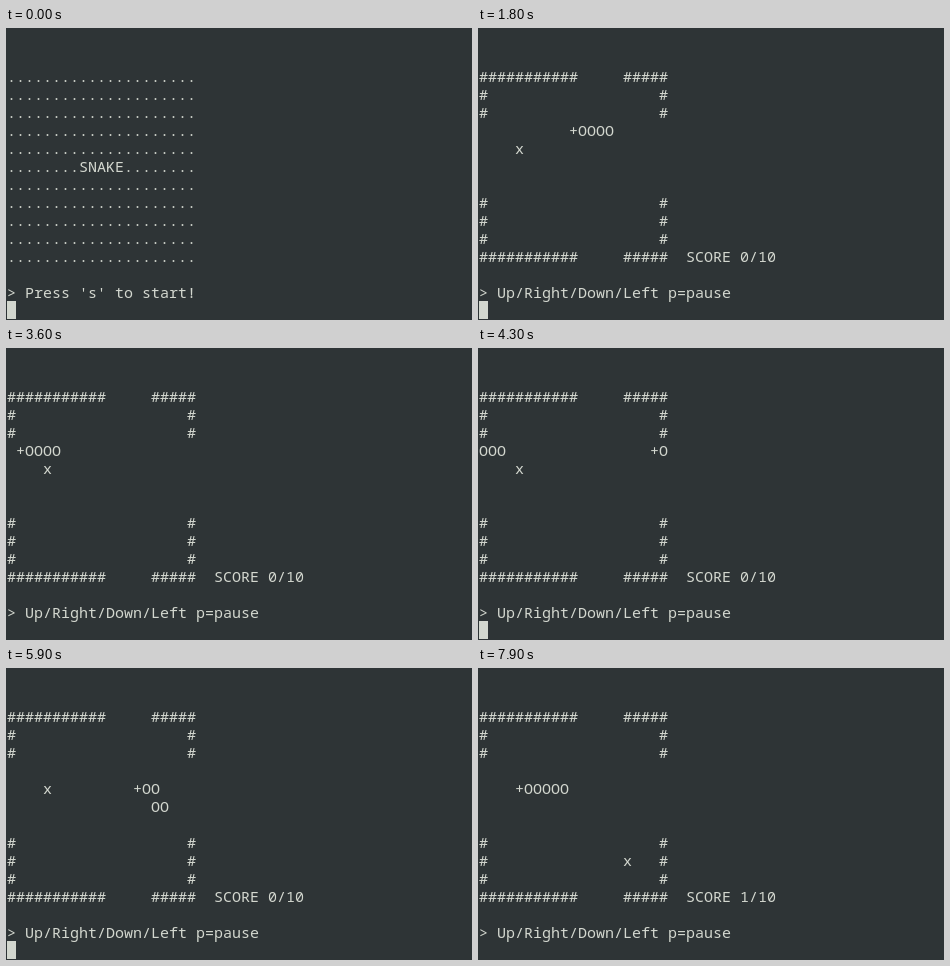
Write an HTML page that moves like this. It is 466 px wide and 292 px high and loops after 8000 ms.

```html
<!DOCTYPE html>
<html lang="en">
<head>
<meta charset="utf-8">
<title>Snake</title>
<style>
  html, body { margin: 0; width: 100%; height: 100%; overflow: hidden; background: #2e3436; }
  svg { display: block; }
  text { font: 15px "Noto Sans Mono", monospace; white-space: pre; fill: #d3d7cf; }
</style>
</head>
<body>
<svg id="term" width="466" height="292" viewBox="0 0 466 292"></svg>
<script>
const NS = "http://www.w3.org/2000/svg";
const LOOP = 8000, START = 1800, EAT = 7900;
const COLS = 21, ROWS = 16, CW = 9, LH = 18, LEFT = 1, TOP = 3;
const svg = document.getElementById("term");

function add(tag, attrs) {
  const el = document.createElementNS(NS, tag);
  for (const key in attrs) el.setAttribute(key, attrs[key]);
  return svg.appendChild(el);
}

const lines = Array.from({ length: ROWS }, (_, r) => add("text", { x: LEFT, y: TOP + LH * r + 15 }));
const cursor = add("rect", { x: LEFT, y: TOP + LH * 15, width: CW, height: LH, fill: "#d3d7cf" });

// Every cell the head visits; the first five are the starting body.
const STEPS = { L: [-1, 0], U: [0, -1], D: [0, 1] };
const trail = [[14, 5]];
for (const dir of "L".repeat(17) + "DDLLU" + "L".repeat(12)) {
  const [x, y] = trail[trail.length - 1], [dx, dy] = STEPS[dir];
  trail.push([(x + dx + COLS) % COLS, y + dy]);
}

const moveTimes = [2100];
for (let t = 2200; t <= 3600; t += 200) moveTimes.push(t);
for (let t = 3900; t <= EAT; t += 200) moveTimes.push(t);

const blinks = [600, 1200, 2300, 2900, 3500, 4100, 6100, 6700, 7300];
const passed = (times, t) => times.filter(v => v <= t).length;

function put(rows, x, y, s) {
  const row = rows[y].padEnd(x);
  rows[y] = row.slice(0, x) + s + row.slice(x + s.length);
}

function titleScreen() {
  const rows = Array(ROWS).fill("");
  for (let y = 2; y <= 12; y++) rows[y] = ".".repeat(COLS);
  put(rows, 8, 7, "SNAKE");
  rows[14] = "> Press 's' to start!";
  return rows;
}

function gameScreen(t) {
  const rows = Array(ROWS).fill(""), eaten = t >= EAT;
  const edge = "#".repeat(11) + " ".repeat(5) + "#".repeat(5);
  const sides = "#" + " ".repeat(19) + "#";
  rows[2] = edge;
  rows[12] = edge + "  SCORE " + (eaten ? 1 : 0) + "/10";
  for (const y of [3, 4, 9, 10, 11]) rows[y] = sides;
  rows[14] = "> Up/Right/Down/Left p=pause";

  if (eaten) put(rows, 16, 10, "x");
  else put(rows, 4, 6, "x");
  const head = 4 + passed(moveTimes, t);
  for (let i = head - (eaten ? 5 : 4); i <= head; i++) put(rows, ...trail[i], i < head ? "O" : "+");
  return rows;
}

function draw(t) {
  const rows = t < START ? titleScreen() : gameScreen(t);
  rows.forEach((s, i) => {
    if (lines[i].textContent !== s) lines[i].textContent = s;
  });
  cursor.setAttribute("visibility", passed(blinks, t) % 2 ? "hidden" : "visible");
}

const begin = performance.now();
function tick() {
  draw((performance.now() - begin) % LOOP);
  requestAnimationFrame(tick);
}
draw(0);
requestAnimationFrame(tick);
</script>
</body>
</html>
```
